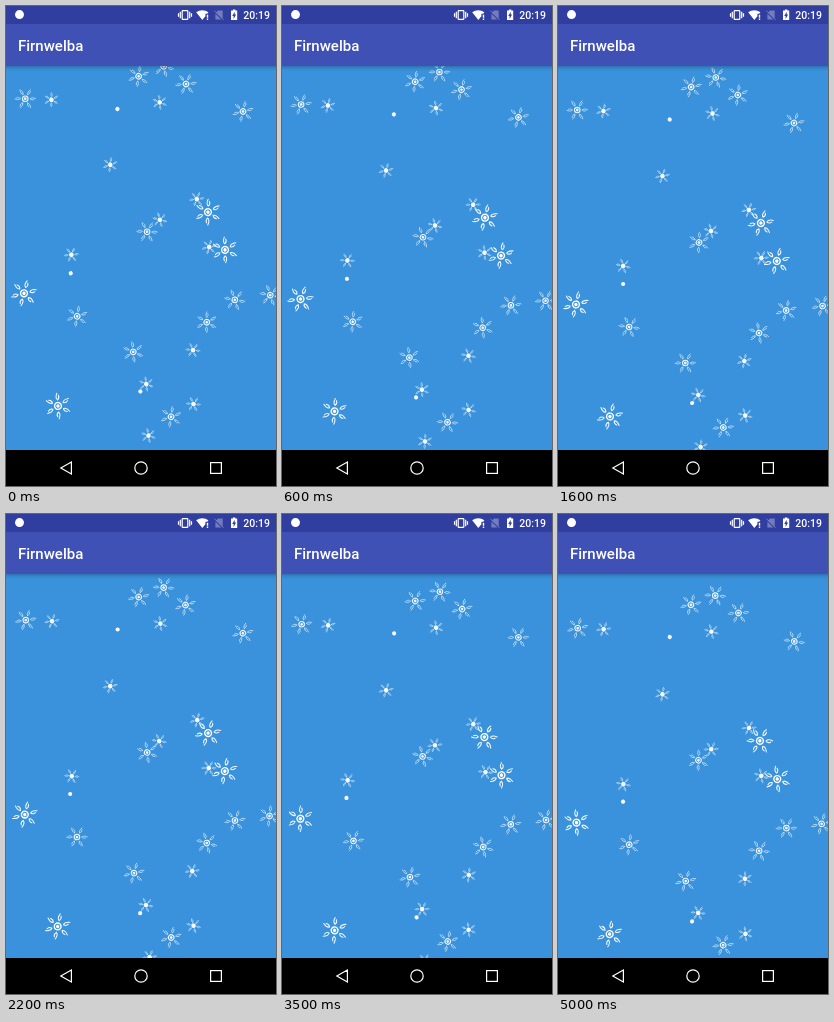
Write an HTML page that moves like this. It is 270x480 px and loops after 5.1 s.

```html
<!DOCTYPE html>
<html lang="en">
<head>
<meta charset="utf-8">
<title>Snowfall</title>
<style>
  html, body { margin: 0; width: 100%; height: 100%; overflow: hidden; background: #3992db; }
  svg { display: block; width: 100vw; height: 100vh; }
  text { font-family: Roboto, sans-serif; font-weight: 500; fill: #fff; }
  .line { fill: none; stroke: #fff; }
</style>
</head>
<body>
<svg viewBox="0 0 270 480">
  <defs>
    <linearGradient id="shade" x2="0" y2="1">
      <stop offset="0" stop-color="#123" stop-opacity=".27"/>
      <stop offset=".5" stop-color="#123" stop-opacity=".1"/>
      <stop offset="1" stop-color="#123" stop-opacity="0"/>
    </linearGradient>
    <!-- Flakes are drawn at a radius of 10 -->
    <path id="petal" class="line" stroke-linecap="round"
      d="M4.6 0C5.6 -1.3 7.6 -1.2 9.7 -.3M4.6 0C5.6 1.2 7 1.3 8.2 .7"/>
    <g id="petals"></g>
    <g id="ring">
      <circle r="2.6" class="line" stroke-width="1.05"/>
      <circle r="1.3" fill="#fff"/>
    </g>
    <g id="large">
      <use href="#petals" stroke-width=".8" opacity=".92"/>
      <use href="#ring"/>
    </g>
    <g id="medium">
      <use href="#petals" stroke-width=".8" opacity=".68"/>
      <use href="#ring" opacity=".9"/>
    </g>
    <g id="small">
      <use href="#petals" stroke-width=".9" opacity=".75"/>
      <circle r="3.2" fill="#fff" opacity=".95"/>
    </g>
    <circle id="dot" r="10" fill="#fff" opacity=".95"/>
  </defs>

  <rect width="270" height="480" fill="#3992db"/>
  <g id="snow"></g>

  <rect y="60" width="270" height="5" fill="url(#shade)"/>
  <rect width="270" height="60" fill="#3f51b5"/>
  <rect width="270" height="18" fill="#303f9f"/>
  <text x="12" y="45" font-size="15">Firnwelba</text>

  <circle cx="13.5" cy="8.6" r="4.5" fill="#fff"/>
  <g class="line" stroke-width="1.2">
    <rect x="176.2" y="4.6" width="5.6" height="8.8" rx=".6"/>
    <path d="M174.3 5.8v6.4M172.5 7.2v3.6M183.7 5.8v6.4M185.5 7.2v3.6"/>
  </g>
  <path fill="#fff" d="M190.2 6.3C193.8 3.6 198.8 3.6 202.4 6.3L201.2 7.8H199.4V10.2L196.3 14Z"/>
  <path fill="#fff" d="M200.8 8.8h1.4v2.9h-1.4zM200.8 12.5h1.4v1.4h-1.4z"/>
  <g opacity=".32">
    <path fill="#fff" d="M212 4.5h4.7v8.2L209.8 6.7zM209.4 7.8l6 5.7h-6z"/>
    <path class="line" d="M208.4 4.7l9.2 9.2"/>
  </g>
  <path fill="#fff" d="M226.9 4.5v-.9h2.4v.9h1.9V14H225V4.5z"/>
  <path fill="#303f9f" d="M228.7 5.7v2.7h1.4l-2.5 4.5v-3h-1.4z"/>
  <text x="264" y="12.8" font-size="10.5" text-anchor="end">20:19</text>

  <rect y="444" width="270" height="36"/>
  <g class="line" stroke-width="1.2">
    <path d="M54.8 462L65.4 456V468Z"/>
    <circle cx="135" cy="462" r="6.2"/>
    <rect x="204.6" y="456.6" width="10.8" height="10.8"/>
  </g>
</svg>
<script>
  const LOOP = 5100;
  const LAST = 20;
  const FALL = 21;
  const RADIUS = { dot: 2.1, small: 7.3, medium: 10.6, large: 13.2 };

  // Where each flake is halfway through its fall
  const PLACES = {
    dot: [[112, 113.5], [64.5, 278], [134.5, 397]],
    small: [[154, 107.5], [46, 105], [104, 170], [191, 204], [153.5, 225], [203, 252],
      [65.5, 260], [186.5, 355], [140, 389], [187, 409.5], [143, 441]],
    medium: [[133, 81], [157.5, 71.5], [180, 89], [19.5, 104], [236.5, 117], [141, 236.5],
      [71, 321], [264, 300], [228.5, 304.5], [201, 327], [127.5, 357], [165.5, 421.5]],
    large: [[202.5, 217], [219, 255], [18.5, 298.5], [52, 410.5]]
  };

  // The snow moves in steps that come ever more slowly
  const stepTime = n => 100 * Math.ceil(.67 * n + .092 * n * n - .22);

  function stepAt(time) {
    let n = 0;
    while (n < LAST && stepTime(n + 1) <= time) n++;
    return n;
  }

  let seed = 11;
  function random() {
    seed = (seed * 16807) % 2147483647;
    return seed / 2147483647;
  }
  const spread = size => (random() - .5) * size;

  function addUse(parent, id, transform = '') {
    const node = document.createElementNS('http://www.w3.org/2000/svg', 'use');
    node.setAttribute('href', '#' + id);
    node.setAttribute('transform', transform);
    parent.append(node);
    return node;
  }

  const petals = document.getElementById('petals');
  for (let turn = 0; turn < 360; turn += 60) addUse(petals, 'petal', `rotate(${turn})`);

  // Small random turns and sways, fixed by the seed
  function makeWalk() {
    let angle = random() * 60;
    return Array.from({ length: LAST + 1 }, () => {
      angle += spread(20);
      return { angle, sway: spread(1.2) };
    });
  }

  const snow = document.getElementById('snow');
  const flakes = Object.entries(PLACES).flatMap(([kind, places]) =>
    places.map(([x, y]) => ({
      node: addUse(snow, kind),
      x, y,
      scale: RADIUS[kind] / 10,
      fall: FALL + spread(2),
      walk: makeWalk()
    })));

  function pose(step) {
    const t = step / LAST;
    const progress = t + .1 * t * (1 - t) - .525;
    for (const { node, x, y, scale, fall, walk } of flakes) {
      const { angle, sway } = walk[step];
      node.setAttribute('transform',
        `translate(${x + sway} ${y + fall * progress}) rotate(${angle}) scale(${scale})`);
    }
  }

  let shown = -1;
  const start = performance.now();
  function tick() {
    const step = stepAt((performance.now() - start) % LOOP);
    if (step !== shown) pose(shown = step);
    requestAnimationFrame(tick);
  }
  tick();
</script>
</body>
</html>
```
